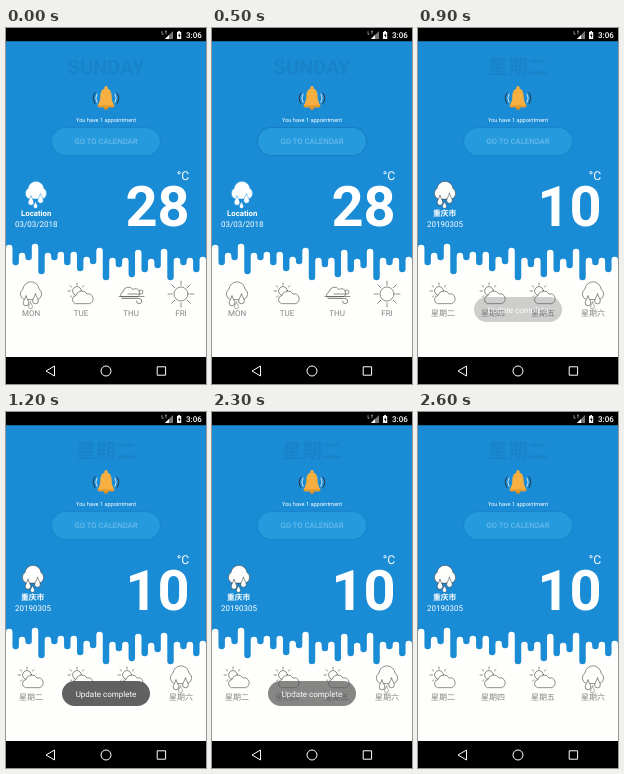
These frames come from a looping animation (200x356 px, 3400 ms). An HTML page:

```html
<!DOCTYPE html>
<html lang="en">
<head>
<meta charset="utf-8">
<style>
  html, body { margin: 0; width: 100%; height: 100%; overflow: hidden; background: #fefefc; }
  svg { display: block; width: 100vw; height: 100vh; text-rendering: geometricPrecision; }
  text { font-family: Roboto, "Noto Sans CJK SC", "Noto Sans CJK", sans-serif; font-size: 8px; fill: #fff; }
  .mid { text-anchor: middle; }
  .bold { font-weight: 700; }
  .title { font-size: 20px; font-weight: 700; fill: #1983ca; }
  .temp { font-size: 56px; font-weight: 700; text-anchor: end; }
  .day { fill: #858585; }
  .line { fill: #fefefc; stroke: #333; stroke-width: .55; stroke-linejoin: round; stroke-linecap: round; }
  .solid { fill: #fff; stroke: #1a8cd6; stroke-width: .5; }
</style>
</head>
<body>
<svg viewBox="0 0 200 356">
  <defs>
    <path id="drop" d="M0-5C1-2 2.8 0 2.8 2A2.8 2.8 0 0 1-2.8 2C-2.8 0-1-2 0-5Z"/>
    <g id="rain">
      <path d="M-7 5.5A6 6 0 0 1-8-5A8.05 8.05 0 0 1 8-5A6 6 0 0 1 7 5.5Z"/>
      <use href="#drop" x="-5" y="7"/>
      <use href="#drop" x="4.5" y="5"/>
      <use href="#drop" transform="translate(-.5 11.5)scale(.7)"/>
    </g>
    <g id="partly">
      <path d="M-4-11v2M-11-8.5l1.6 1.4M-13-3h2.5M3-8.5l-1.6 1.4M-10.5 3l1.4-1.2"/>
      <circle cx="-4" cy="-3" r="4.4"/>
      <path d="M-6 9.5A4.2 4.2 0 0 1-5 1.5A6 6 0 0 1 6 0A5 5 0 0 1 9 9.5Z"/>
    </g>
    <g id="wind">
      <path d="M-10 2.5A3 3 0 0 1-8-2A5.5 5.5 0 0 1 2-4.5A4 4 0 0 1 7 2.5Z"/>
      <path d="M-3 0H10A2 2 0 1 0 8-2.5M-12 2.5H13M-9 4.5H8A2.6 2.6 0 1 1 5.5 7" fill="none"/>
    </g>
    <g id="sun"><circle r="7"/></g>
  </defs>

  <path id="sky" fill="#1a8cd6"/>

  <!-- status bar -->
  <path d="M0 0H200V13.3H0Z"/>
  <path d="M167 3V11H159Z" fill="#777"/>
  <path d="M163 7V11H159Z" fill="#fff"/>
  <path d="M156 3.2v3h1.6M159 3.2h2M160 3.2v3" fill="none" stroke="#ddd" stroke-width=".6"/>
  <path d="M171 4h1.2V3h1.8v1h1.2V11H171Z" fill="#fff"/>
  <path d="M173.6 5L172 7.8h1V10l1.5-3h-.9Z"/>
  <text x="180" y="10" font-weight="500">3:06</text>

  <!-- reminder -->
  <g fill="none" stroke-width=".9" stroke-linecap="round">
    <path d="M91 66Q88.4 70 91 74.5M109 66Q111.6 70 109 74.5" stroke="#e8eef2"/>
    <path d="M89 65Q85.2 70 89 75.5M111 65Q114.8 70 111 75.5" stroke="#26303a"/>
  </g>
  <g transform="translate(8 0)scale(.92 1)">
    <circle cx="100" cy="79.7" r="2.4" fill="#d98a28"/>
    <path d="M98.5 60.5A1.7 1.7 0 1 1 101.5 60.5C105.5 61.7 106 65 106.2 69C106.4 73 107.5 75 109 77Q109.4 79.2 107.5 79.2H92.5Q90.6 79.2 91 77C92.5 75 93.6 73 93.8 69C94 65 94.5 61.7 98.5 60.5Z" fill="#f6af40"/>
    <path d="M91 77.3H109Q109.4 79.2 107.5 79.2H92.5Q90.6 79.2 91 77.3Z" fill="#e39a30"/>
  </g>
  <text class="mid" x="100" y="94" style="font-size:5.6px">You have 1 appointment</text>
  <rect id="button" x="46" y="100" width="108" height="27" rx="13.5" fill="#259bde"/>
  <text class="mid" x="100" y="116.4" style="font-size:7.7px;font-weight:500;fill:#67b9e9">GO TO CALENDAR</text>

  <text x="170.7" y="152" style="font-size:12.2px">°C</text>
  <g id="before"></g>
  <g id="after"></g>

  <g id="toast">
    <rect x="56" y="269" width="88" height="25" rx="12.5" fill="#595959" fill-opacity=".95"/>
    <text class="mid" x="100" y="284.5">Update complete</text>
  </g>

  <!-- navigation bar -->
  <path d="M0 328.9H200V356H0Z"/>
  <g fill="none" stroke="#fff" stroke-linejoin="round">
    <path d="M48.5 338V348L40 343Z"/>
    <circle cx="100" cy="343" r="5"/>
    <rect x="151.2" y="338.8" width="8.4" height="8.4"/>
  </g>
</svg>
<script>
const LOOP = 3400, STEP = 100;
const $ = id => document.getElementById(id);
const clamp = v => Math.min(1, Math.max(0, v));
const ramp = (t, from, to) => clamp((t - from) / (to - from));

// Melting edge: rounded notches alternate with rounded drips.
const ends = [220, 234, 228, 229, 219, 243, 228, 229, 227, 234, 227, 240, 232, 233, 223, 249,
  233, 236, 233, 246, 225, 241, 234, 237, 224, 249, 233, 234, 233, 241, 232];
const w = 200 / ends.length;
$('sky').setAttribute('d', 'M0 13' + ends.map((y, i) =>
  `V${y}a${w / 2} ${w / 2} 0 0 ${i % 2 ? 0 : 1} ${w} 0`).join('') + 'V13Z');

let rays = '';
for (let i = 0; i < 8; i++) {
  rays += `<path d="M0-8.8V-13" transform="rotate(${i * 45})"/>`;
}
$('sun').innerHTML += rays;

function forecast({ title, temp, city, date, headerIcon, days }) {
  const icons = days.map(([label, icon], i) => {
    const x = 25 + i * 50;
    return `<use class="line" href="#${icon}" x="${x}" y="266"/>
      <text class="day mid" x="${x}" y="288">${label}</text>`;
  }).join('');
  return `<text class="title mid" x="100" y="46">${title}</text>
    <text class="temp" x="183.7" y="197.5">${temp}</text>
    ${headerIcon}
    <text class="bold" x="15" y="187.7" style="font-size:7.8px">${city}</text>
    <text x="9" y="198.7">${date}</text>${icons}`;
}

$('before').innerHTML = forecast({
  title: 'SUNDAY', temp: 28, city: 'Location', date: '03/03/2018',
  headerIcon: '<use class="solid" href="#rain" x="30" y="165.5"/>',
  days: [['MON', 'rain'], ['TUE', 'partly'], ['THU', 'wind'], ['FRI', 'sun']]
});
$('after').innerHTML = forecast({
  title: '星期二', temp: 10, city: '重庆市', date: '20190305',
  headerIcon: '<use class="line" href="#rain" x="27" y="165.5"/>',
  days: [['星期二', 'partly'], ['星期四', 'partly'], ['星期五', 'partly'], ['星期六', 'rain']]
});

function draw(time) {
  const t = Math.floor(time / STEP) * STEP;
  const updated = t >= 900;
  $('before').style.display = updated ? 'none' : '';
  $('after').style.display = updated ? '' : 'none';

  const press = ramp(t, 100, 500) - ramp(t, 600, 900);
  $('button').style.filter = `drop-shadow(0 .7px .8px rgba(0,0,0,${.12 + .13 * press}))`;

  // The toast decelerates in and accelerates out.
  const shown = 1 - (1 - ramp(t, 840, 1200)) ** 2;
  const gone = ramp(t, 2050, 2560) ** 2;
  $('toast').style.opacity = shown * (1 - gone);
}

const start = performance.now();
function tick() {
  draw((performance.now() - start) % LOOP);
  requestAnimationFrame(tick);
}
tick();
</script>
</body>
</html>
```
